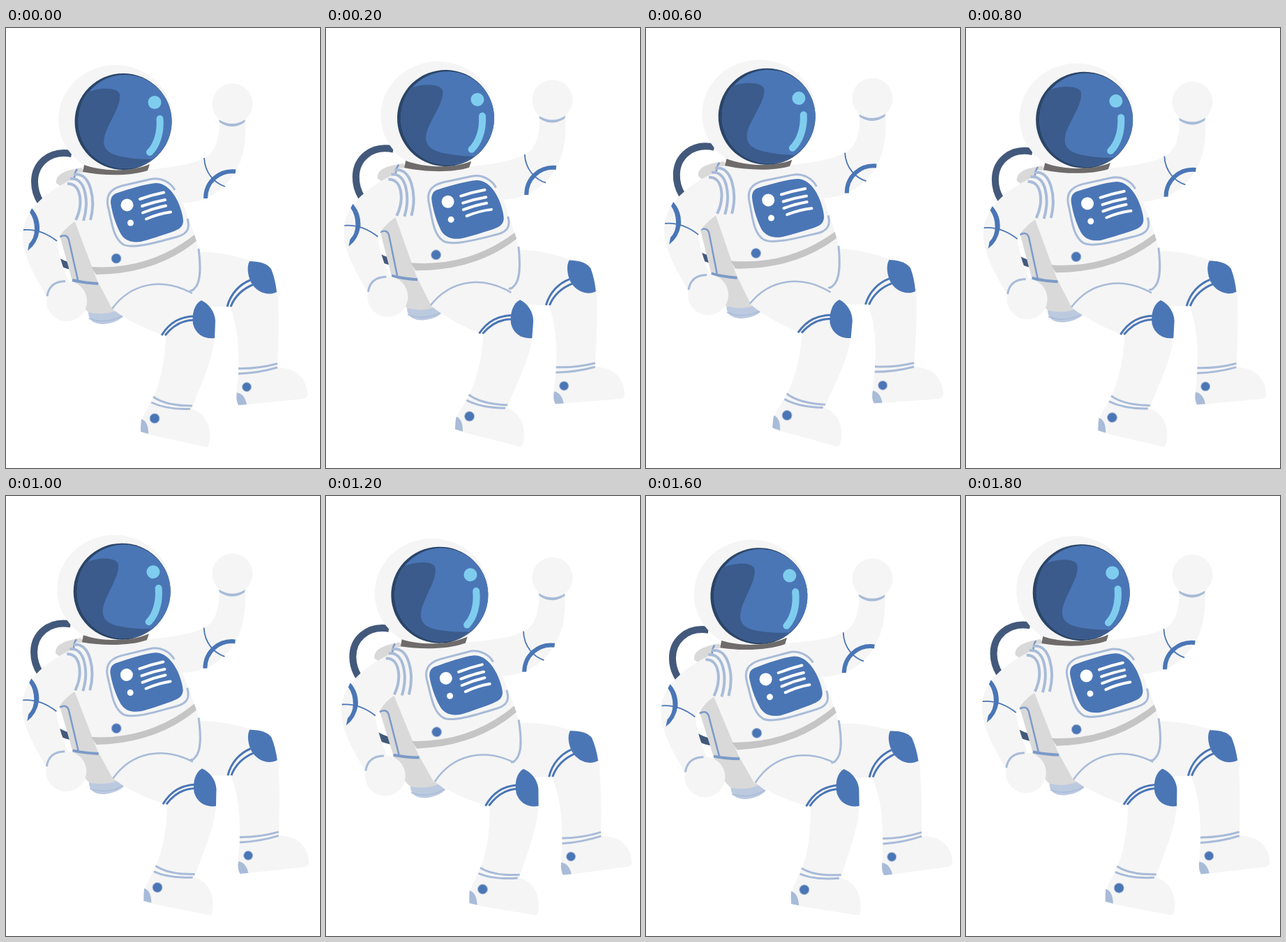
An HTML page that plays this animation: 450x630 px, repeating every 1.9 s.

```html
<!DOCTYPE html>
<html lang="en">
<head>
<meta charset="utf-8">
<title>Floating astronaut</title>
<style>
  html, body { margin: 0; width: 100%; height: 100%; overflow: hidden; background: #fff; }
  svg { display: block; width: 100vw; height: 100vh; }
  .suit { fill: #f5f5f5; }
  .blue { fill: #4a76b6; }
  .pale { fill: #a8bbd8; }
  .cyan { fill: #7fcdee; }
  .pack { fill: #d9d9d9; }
  .button { fill: #4a76b6; stroke: #a8bbd8; stroke-width: 1; }
  .line { fill: none; stroke: #a8bbd8; stroke-width: 3; }
  .band { fill: none; stroke: #4a76b6; stroke-width: 3; }
  .thin { fill: none; stroke: #4a76b6; stroke-width: 1.8; }
  .seam { fill: none; stroke: #7b9ac8; stroke-width: 2.5; }
  .tube { fill: none; stroke: #43597b; stroke-width: 10; }
  .label { fill: none; stroke: #fff; stroke-width: 4; stroke-linecap: round; }
</style>
</head>
<body>
<svg viewBox="0 0 450 630">
  <!-- backpack and far leg -->
  <g class="body">
    <path class="tube" d="M94 180C62 174 41 195 41 220C41 232 44 241 50 250"/>
    <path class="tube" stroke-width="11" d="M70 331Q80 338 93 341"/>
    <path class="pack" d="M72 222C71 209 84 204 108 200L125 215L90 235Z"/>
    <path class="seam" stroke-width="2" d="M102 202Q98 207 98 216"/>
    <path fill="#bccae0" d="M118 404C117 418 125 424 140 424C152 423 162 419 168 413L150 398Z"/>
    <path class="line" stroke-width="2" style="stroke-width:1.5" d="M119 416Q143 425 167 412"/>
    <path class="pack" d="M77 297Q85 284 98 276L108 280L132 350L158 405Q140 412 118 407Q100 390 95 362Z"/>
    <path class="seam" d="M77 299Q87 294 90 303L103 361"/>
    <path class="seam" style="stroke-width:4" d="M95 361Q112 365 132 366"/>

    <path class="suit" d="M268 321C305 319 330 327 354 334L389 376C392 420 390 455 389 487L333 495C334 460 333 430 321 399Q295 400 268 397Z"/>
    <path class="band" d="M317 399C322 380 335 367 350 361M322 399C328 384 340 373 355 367"/>
    <path class="blue" d="M349 334Q372 334 380 345Q386 360 388 378C374 385 358 377 351 364C346 353 345 341 349 334Z"/>
    <path class="suit" d="M333 494L389 486C415 486 431 501 432 525Q431 530 426 531L338 540Q330 540 330 528Z"/>
    <path class="line" d="M333 487.500Q362 488 389 480.500M333 495Q362 494 389 486"/>
    <path class="pale" d="M331 522Q342 524 345 539L333 540Q329 532 331 522Z"/>
    <circle class="button" cx="345" cy="514" r="6.500"/>
  </g>

  <!-- raised arm -->
  <g class="wave">
    <path class="suit" d="M203 203C245 199 270 194 284 186C300 179 306 160 306 132L343 132C344 162 341 185 329 205C315 230 290 251 245 251L210 235Z"/>
    <circle class="suit" cx="324.500" cy="108.500" r="29"/>
    <path class="pale" d="M305 131Q324 143 343 131L342 135Q324 147 306 135Z"/>
    <path class="band" style="stroke-width:6" d="M329 205.500C306 203 286 220 286 244"/>
    <path class="thin" d="M284 186C285 208 299 222 314 227"/>
  </g>

  <!-- torso -->
  <g class="body">
    <path class="suit" d="M100 207L207 203L243 225Q262 270 276 316C281 350 278 372 265 380L230 396L152 402L130 360L98 275Z"/>
    <path class="line" d="M242 232C236 221 222 213 207 216.500L166 226C148 231 142 241 147 259C152 281 154 301 168 310C182 317 215 307 245 299C260 295 264 287 260 273"/>
    <path class="blue" d="M160 236C175 231 200 223 215 222C229 222 240 235 246 248C251 259 254 270 254 277C253 287 245 289 238 292C220 298 205 303 193 306C178 308 168 303 163 292C157 280 152 265 150 250C150 242 153 238 160 236Z"/>
    <circle cx="173.500" cy="253.500" r="9" fill="#fff"/>
    <circle cx="178.500" cy="279" r="4.500" fill="#fff"/>
    <path class="label" d="M192 245Q209 239 226 235.500M195 255Q212 249 228 246M196 264.500Q212 258 229 254.500M201 273.500Q218 266 236 263.500"/>
    <path fill="#c5c5c5" d="M122 342Q205 347 270 296L273 305Q215 352 129 353Z"/>
    <circle class="button" cx="158" cy="330" r="7"/>
  </g>

  <!-- near leg -->
  <g class="leg">
    <path class="suit" d="M152 402C180 365 225 358 266 380L283 391L299 444C295 480 278 512 266 546L208 536C222 508 228 475 229 441C205 433 175 420 152 402Z"/>
    <path class="line" style="stroke-width:2.500" d="M152 402C180 364 225 357 267 380"/>
    <path class="band" d="M223 440C235 421 250 413 271 412.500M228 440C240 425 253 418 270 418"/>
    <path class="blue" d="M280 390C291 395 299 406 300 419L299 444C285 446 272 439 268 424C266 409 270 395 280 390Z"/>
    <path class="suit" d="M206 538L265 545C285 551 294 568 292 590Q291 600 287 600L196 580Q193 575 194 564C198 550 204 545 206 538Z"/>
    <path class="line" d="M211 528C225 538 245 541 267 541M208 536C225 544 245 546 264 545.500"/>
    <path class="pale" d="M194 560Q204 563 204 581L193 578Q193 568 194 560Z"/>
    <circle class="button" cx="213" cy="559" r="7"/>
  </g>
  <path class="line body" d="M276 316C279 340 280 364 270 373Q267 377 263 376"/>

  <!-- lowered arm -->
  <g class="arm">
    <path class="suit" d="M104 212C60 232 24 260 24 297C24 328 45 362 60 387L95 376C84 350 74 322 73 305C78 293 90 283 100 276L123 274C128 250 124 220 104 212Z"/>
    <circle class="suit" cx="87" cy="391" r="29"/>
    <path class="line" d="M59 384Q62 363 85 362.500"/>
    <path class="blue" d="M37 258Q49 271 48 290Q45 309 31 319L33 309Q41 301 41 288Q41 274 34 264Z"/>
    <path class="thin" d="M25 289Q50 287 73 305"/>
    <path class="line" style="stroke-width:4" d="M97 210C121 205 129 245 121 275M92 216C115 213 119 250 111 276M88 223C108 222 111 252 100 275"/>
  </g>

  <!-- head -->
  <g class="body">
    <ellipse class="suit" cx="157" cy="131" rx="82" ry="78"/>
    <path fill="#6e6b6a" d="M112 196C140 206 180 206 206 195L203 204C180 212 140 212 110 206Z"/>
    <ellipse cx="168" cy="134" rx="69.500" ry="69" fill="#2b4568"/>
    <ellipse class="blue" cx="170.500" cy="134" rx="67" ry="67"/>
    <path fill="#3b5b8c" d="M117 92C135 84 161 85 163 95C165 111 150 130 142 152C136 172 146 180 165 184C180 187 194 188 209 188C187 204 152 207 126 184C98 159 98 116 117 92Z"/>
    <circle class="cyan" cx="213" cy="106.500" r="9.500"/>
    <path d="M220.500 130C222 150 216 168 206 178" fill="none" stroke="#7fcdee" stroke-width="10" stroke-linecap="round"/>
  </g>
</svg>
<script>
const LOOP = 1900, STEP = 100;
const RATE = 0.00117;            // sway per millisecond
const TOP = 447, BOTTOM = 1430;  // turning points of the float

function sway(t) {
  if (t < TOP) return -RATE * t;
  if (t < BOTTOM) return RATE * (t - 2 * TOP);
  return RATE * (2 * BOTTOM - 2 * TOP - t);
}

function place(name, transform) {
  for (const part of document.querySelectorAll('.' + name)) part.setAttribute('transform', transform);
}

function draw(now) {
  const t = Math.floor((now % LOOP) / STEP) * STEP;
  const s = sway(t);
  place('body', `rotate(${-4.75 * s} 423 312)`);
  place('leg', `rotate(${-8.1 * s} 298 333)`);
  place('arm', `translate(${-6 * s} ${26.5 * s})`);
  place('wave', `translate(0 ${23 * s}) rotate(${2.2 * s} 324 109)`);
}

const start = performance.now();
function tick() {
  draw(performance.now() - start);
  requestAnimationFrame(tick);
}
tick();
</script>
</body>
</html>
```
